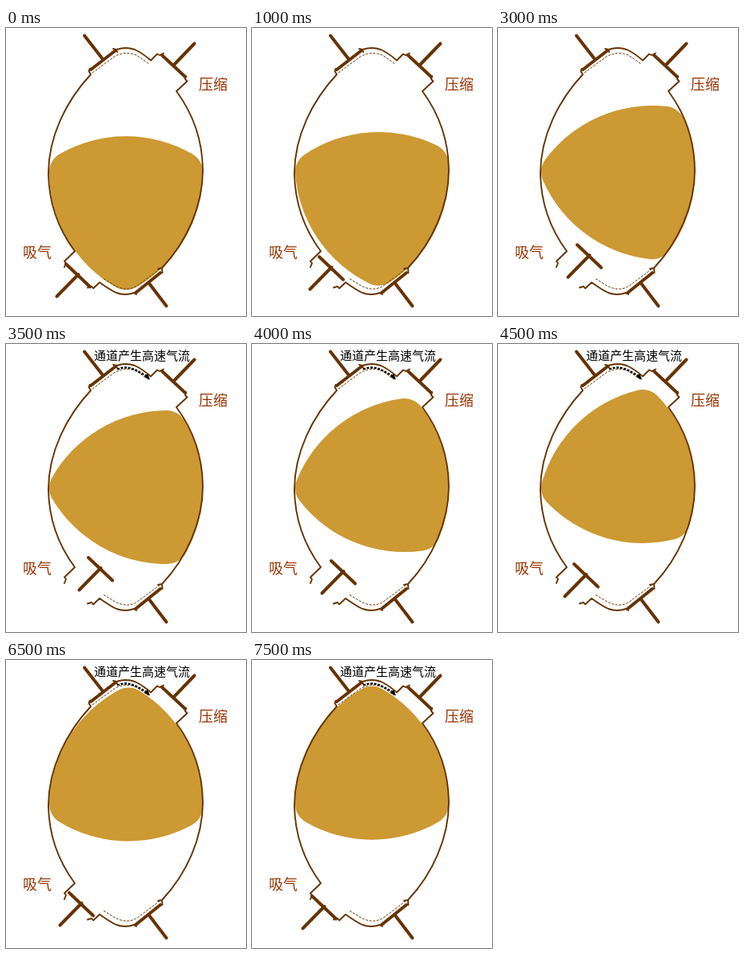
An HTML page for the animation above (8 s loop, 300 px wide and 360 px high).

```html
<!DOCTYPE html>
<html lang="zh">
<head>
<meta charset="utf-8">
<style>
  html, body { margin: 0; width: 100%; height: 100%; overflow: hidden; background: #fff; }
  svg { display: block; width: 300px; height: 360px; }
  .line { fill: none; stroke: #630; stroke-width: 1.9; stroke-linejoin: round; stroke-linecap: round; }
  .valve { fill: none; stroke: #630; stroke-width: 4; stroke-linecap: round; }
  .dash { fill: none; stroke: #630; stroke-width: 1; stroke-dasharray: 3 1.6; }
  text { font-family: "Noto Sans CJK SC", "Noto Sans CJK", sans-serif; font-weight: 300; }
  .label { font-size: 18px; fill: #930; }
  .note { font-size: 15px; fill: #000; }
</style>
</head>
<body>
<svg viewBox="0 0 300 360">
  <path id="rotor" fill="#c93"/>

  <!-- passages -->
  <path class="dash" d="M108 56L136 35.5Q150 28 164 34.5L179 45"/>
  <path class="dash" d="M122 313.5L137 322.5Q151 329.5 163 323L194 300"/>

  <!-- housing -->
  <path class="line" d="M104.5 51L103.5 54L106 58C76 90 53 135 53 182A167 167 0 0 0 86 279L73 291.5L75 294L73 299"/>
  <path class="line" d="M102 324.5L107 323L109 325.5L117 318Q131 328 138 331Q149 335 160 331"/>
  <path class="line" d="M138 27Q150 23 161 27Q170 31 181 40.5L189 32.5L192 34L197 31.5"/>
  <path class="line" d="M225 60L224 64L226.5 66.5L213 79A169 169 0 0 1 246 178C246 222 226 267 195 300L190 301M195 300L195.5 306"/>
  <path class="line" d="M134 26L138 27L139 30M160 331L163 333"/>

  <!-- valves -->
  <path class="valve" d="M106 52L137 28M121 39L98 9.5"/>
  <path class="valve" d="M195 34L224 61M210 46L235.5 19.5"/>
  <path class="valve" d="M162 331L193 306M178 318L200.5 347.5"/>
  <path id="inlet" class="valve" d="M75 295L105 323.5M90.5 308L63.5 335.5"/>

  <text class="label" x="241" y="77">压缩</text>
  <text class="label" x="21" y="287">吸气</text>

  <g id="jet" visibility="hidden">
    <path d="M139 31.5Q151 27 162 32.5L176 40" fill="none" stroke="#000" stroke-width="2.4" stroke-dasharray="3 1.6"/>
    <path d="M173 41.5L177 37L180 44.5Z"/>
    <text class="note" x="110" y="20">通道产生高速气流</text>
  </g>
</svg>
<script>
  const STEP = 500, LOOP = 8000, JET_START = 3500;
  const SIDE = 140, ROUND = 26, PIVOT = [80, 180];
  const turns = [0, 1.8, 4, 6.9, 11.4, 17.3, 23.6, 30.5, 37.9, 43.9, 49.2, 53.8, 56.7, 58.6, 59.4, 60];
  const lifts = [0, 5, 9, 12, 16, 20, 24, 28, 24, 20, 16, 12, 8, 4, 2, 0];
  const [rotor, inlet, jet] = ["rotor", "inlet", "jet"].map(id => document.getElementById(id));

  // Point at an angle in degrees, counterclockwise from the right.
  function polar([x, y], radius, deg) {
    const a = deg * Math.PI / 180;
    return [x + radius * Math.cos(a), y - radius * Math.sin(a)];
  }

  // Rounded triangle of constant width, turned about its left corner.
  function rotorPath(turn) {
    const right = polar(PIVOT, SIDE, turn);
    const low = polar(PIVOT, SIDE, turn - 60);
    const centres = [right, low, PIVOT, right, low, PIVOT];
    let d = "M" + polar(right, ROUND, turn);
    centres.forEach((c, i) => {
      const r = i % 2 ? SIDE + ROUND : ROUND;
      d += `A${r} ${r} 0 0 0 ${polar(c, r, turn + 60 * (i + 1))}`;
    });
    return d + "Z";
  }

  const start = performance.now();
  function draw(now) {
    const t = Math.max(0, now - start) % LOOP;
    const i = Math.floor(t / STEP);
    rotor.setAttribute("d", rotorPath(turns[i]));
    inlet.setAttribute("transform", `translate(${lifts[i]} ${-lifts[i]})`);
    jet.setAttribute("visibility", t >= JET_START ? "visible" : "hidden");
    requestAnimationFrame(draw);
  }
  draw(start);
</script>
</body>
</html>
```
